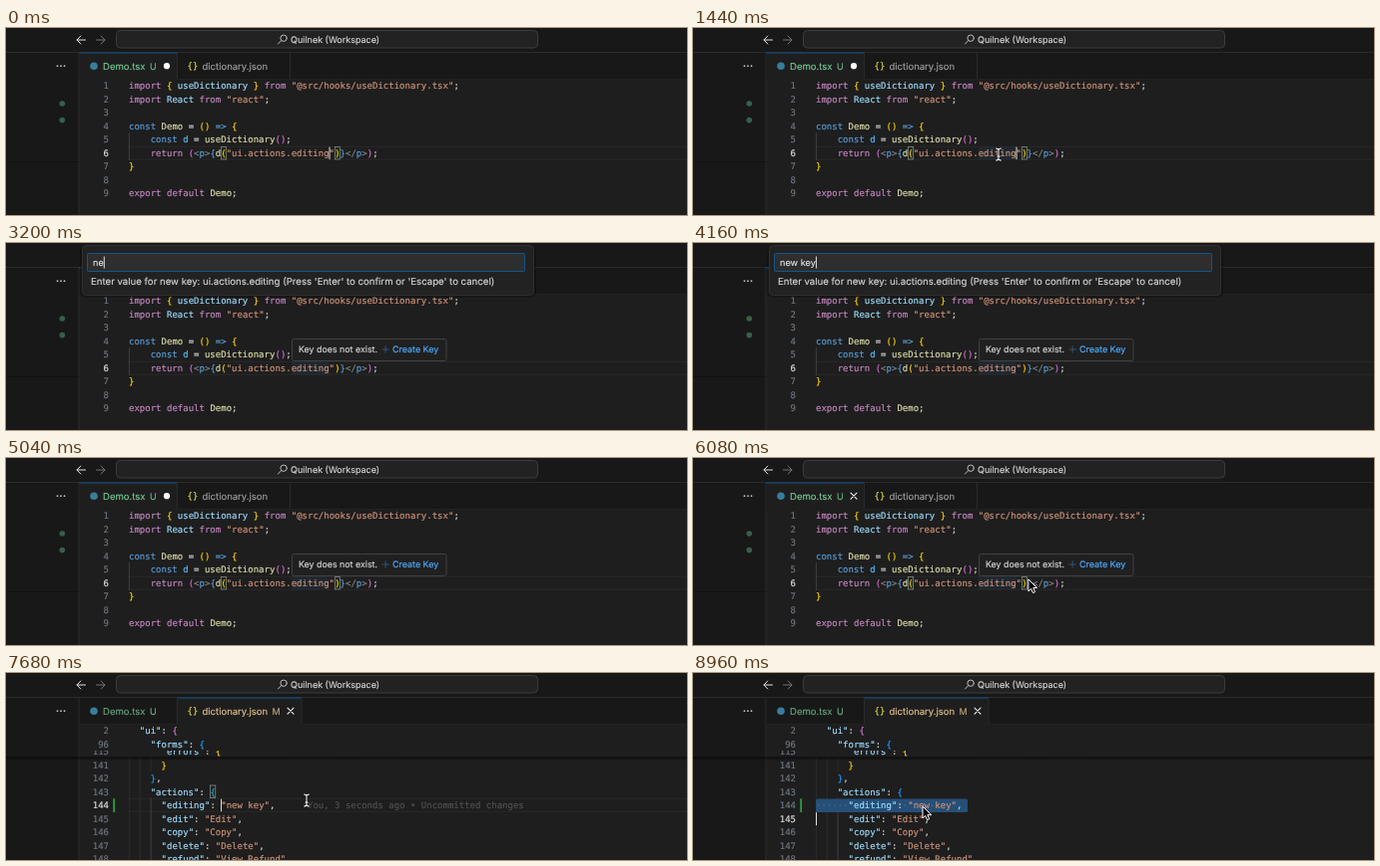
An HTML page for the animation above (9040 ms loop, 682 by 188 pixels).

```html
<!DOCTYPE html>
<html lang="en">
<head>
<meta charset="utf-8">
<title>Create a missing dictionary key</title>
<style>
  html, body { margin: 0; width: 100%; height: 100%; overflow: hidden; background: #181818; }
  svg { display: block; width: 682px; height: 188px; }
  text {
    white-space: pre; text-rendering: geometricPrecision;
    fill: currentColor; stroke: currentColor; stroke-width: .16px;
  }
  .code { font: 9px "DejaVu Sans Mono", monospace; }
  .ui { font-family: Inter, sans-serif; }
  .line { fill: none; stroke-linecap: round; stroke-linejoin: round; }
</style>
</head>
<body>
<svg id="stage" viewBox="0 0 682 188"></svg>
<script>
const LOOP = 9040, STEP = 80;
const LEFT = 123, CHAR = 5.425, ROW = 13.5;

// Moments at which the scene changes, in ms
const at = {
  hover: 1440, tooltip: 1760, popup: 2720, typing: 3040, close: 4240,
  save: 5440, open: 7200, blame: 7360, select: 8800
};

// Pointer path: time, x, y
const path = [
  [1040, 336, 146], [1440, 306, 127], [1920, 306, 127], [2400, 402, 107],
  [5600, 402, 107], [6400, 300, 130], [7040, 300, 130], [7200, 301, 128],
  [7840, 301, 128], [8480, 230, 134], [9040, 230, 134]
];

const ink = {
  k: '#c586c0', v: '#9cdcfe', s: '#ce9178', c: '#569cd6', f: '#dcdcaa',
  n: '#4fc1ff', w: '#d4d4d4', t: '#808080',
  1: '#ffd700', 2: '#da70d6', 3: '#179fff'
};
const bright = '#e0e0e0', muted = '#9d9d9d', dimNumber = '#6e7681';

// Each segment starts with its ink key; segments are split by "~"
const tsx = [
  'kimport ~1{ ~vuseDictionary ~1} ~kfrom ~s"@src/hooks/useDictionary.tsx"~w;',
  'kimport ~vReact ~kfrom ~s"react"~w;',
  '',
  'cconst ~fDemo ~w= ~1() ~c=> ~1{',
  'w    ~cconst ~nd ~w= ~fuseDictionary~2()~w;',
  'w    ~kreturn ~2(~t<~cp~t>~c{~fd~1(~s"ui.actions.editing"~1)~c}~t</~cp~t>~2)~w;',
  '1}',
  '',
  'kexport ~kdefault ~fDemo~w;'
];
const entry = (key, value) => `w      ~v"${key}"~w: ~s"${value}"~w,`;
const json = [
  'w      ~1}',
  'w    ~3}~w,',
  'w    ~v"actions"~w: ~3{',
  entry('editing', 'new key'), entry('edit', 'Edit'), entry('copy', 'Copy'),
  entry('delete', 'Delete'), entry('refund', 'View Refund')
];

const col = n => LEFT + n * CHAR;
const rect = (x, y, w, h, fill, more = '') =>
  `<rect x="${x}" y="${y}" width="${w}" height="${h}" fill="${fill}" ${more}/>`;
const stroke = (d, color, width = 1, more = '') =>
  `<path class="line" d="${d}" stroke="${color}" stroke-width="${width}" ${more}/>`;
const dot = (x, y, r, fill, more = '') => `<circle cx="${x}" cy="${y}" r="${r}" fill="${fill}" ${more}/>`;
const label = (x, y, size, color, str, more = '') =>
  `<text class="ui" x="${x}" y="${y}" font-size="${size}" color="${color}" ${more}>${str}</text>`;
const mono = (x, y, color, str, more = '') =>
  `<text class="code" x="${x}" y="${y}" color="${color}" ${more}>${str}</text>`;
const group = (id, body) => `<g id="${id}">${body}</g>`;

function code(source, y) {
  let n = 0;
  return source.split('~').filter(Boolean).map(part => {
    const str = part.slice(1), x = col(n);
    n += str.length;
    return mono(x, y, ink[part[0]], str.replace(/</g, '&lt;'));
  }).join('');
}
const lineNo = (n, y, more = '', color = dimNumber) =>
  mono(103, y, color, n, `text-anchor="end" ${more}`);
const caret = (id, x, y, h = 12.5) => rect(x, y, 1, h, bright, `id="${id}"`);
const bracket = (n, y) => rect(col(n) + .2, y, 5.2, 12.4, '#00640022', 'stroke="#888" stroke-width=".8"');
const activeLine = y => stroke(`M123 ${y}H682M123 ${y + 13}H682`, '#292929');
const guide = (n, y1, y2, color = '#303030') => stroke(`M${col(n) + .4} ${y1}V${y2}`, color, .8);
const cross = x => stroke(`M${x - 3} 35.2l6 6m0 -6l-6 6`, '#f0f0f0', 1.1);

const frameArt =
  rect(0, 0, 682, 188, '#181818') +
  rect(73, 51, 609, 137, '#1e1e1e') +
  stroke('M0 24.5H682M73 24.5V188', '#2b2b2b') +
  stroke('M73.5 51.5H682', '#222222') +
  [51.5, 55, 58.5].map(x => dot(x, 38.2, .9, '#c4c4c4')).join('');

const titleBar = group('titleBar',
  stroke('M79.5 12H71M74.8 8L71 12l3.8 4', bright) +
  stroke('M90.5 12H99M95.2 8L99 12l-3.8 4', '#757575') +
  rect(110.5, 2.5, 422, 17.5, '#222222', 'rx="4" stroke="#3c3c3c"') +
  stroke('M275.6 12.7L272.5 16M281.3 10.2a3.2 3.2 0 1 1 -6.4 0a3.2 3.2 0 1 1 6.4 0', '#cccccc', .9) +
  label(285, 15, 9, '#d4d4d4', 'Quilnek (Workspace)'));

const tabs =
  group('tabsTsx',
    rect(73.5, 25, 98, 27, '#1e1e1e') + rect(73, 24.5, 98.5, 1, '#0f5288') +
    stroke('M171.5 25V51M284.5 25V51', '#2b2b2b')) +
  group('tabsJson',
    rect(171.5, 25, 124.5, 27, '#1e1e1e') + rect(171, 24.5, 125, 1, '#0f5288') +
    stroke('M171.5 25V51M296 25V51', '#2b2b2b') +
    label(266.5, 41.6, 9, '#c0a478', 'M') + cross(285)) +
  dot(88, 38.2, 3.8, '#397d9c') +
  label(97, 41.6, 9.55, '#73c991', 'Demo.tsx', 'id="nameTsx"') +
  label(144, 41.6, 9, '#68b583', 'U') +
  mono(181.5, 41, '#d6d645', '{}') +
  label(196.5, 41.6, 9.5, muted, 'dictionary.json', 'id="nameJson"') +
  dot(161, 38.2, 3.1, '#ffffff', 'id="unsaved"') +
  group('saved', cross(161));

const tsxView = group('tsxView',
  stroke('M0 134.5H72', '#111111') +
  dot(56.3, 76, 2.8, '#37604a') + dot(56.3, 92.6, 2.8, '#37604a') +
  activeLine(119.3) + guide(0, 105.5, 132.5, '#4a4a4a') +
  rect(col(30), 119.6, 7 * CHAR, 12.4, '#264f78', 'id="wordHover" opacity=".22"') +
  group('brackets', bracket(17, 119.6) + bracket(38, 119.6)) +
  tsx.map((s, i) => {
    const y = 61 + i * ROW;
    return lineNo(i + 1, y, '', i === 5 ? bright : dimNumber) + code(s, y);
  }).join('') +
  caret('caretTsx', col(37) - .2, 119.6));

const rowY = i => 95.6 + i * ROW;
const jsonView = group('jsonView',
  group('jsonActive', activeLine(126.4) + bracket(15, 113)) +
  guide(0, 85, 188) + guide(2, 85, 188) + guide(4, 85, 99) + guide(4, 126, 188, '#484848') +
  group('selection',
    rect(LEFT, 126.4, 152, 13.5, '#264f78', 'rx="1.5"') +
    [0, 1, 2, 3, 4, 5, 16, 21].map(n => dot(col(n + .5), 133, .55, '#7389a0')).join('')) +
  json.map((s, i) => lineNo(141 + i, rowY(i), `id="no${141 + i}"`) + code(s, rowY(i))).join('') +
  rect(107.3, 126.3, 1.8, 13.6, '#2ea043') +
  mono(col(33), rowY(3), '#505050', 'You, 3 seconds ago • Uncommitted changes', 'id="blame"') +
  rect(73.5, 52, 609, 32.5, '#1e1e1e') +
  `<g clip-path="url(#pushed)">${lineNo(115, 82.2)}${code('w      ~v"errors"~w: ~1{', 82.2)}</g>` +
  lineNo(2, 61.1) + code('w  ~v"ui"~w: ~2{', 61.1) +
  lineNo(96, 74.6) + code('w    ~v"forms"~w: ~3{', 74.6) +
  rect(0, 84.3, 682, 4, 'url(#shade)') +
  caret('caretJson', col(17) - .2, 126.7) +
  caret('caretSelect', LEFT, 140.2, 13));

const tooltip = group('tooltip',
  rect(286.5, 96.5, 154.5, 22, '#202020', 'rx="2" stroke="#414141"') +
  label(293, 110.3, 8.85, '#d4d4d4', 'Key does not exist.') +
  stroke('M376.8 107H383.4M380.1 103.7V110.3', '#2b628f', .8) +
  label(387, 110.3, 8.95, '#4daafc', 'Create Key'));

const popup = group('popup',
  rect(74, 4, 457, 51, '#000', 'rx="5" opacity=".25"') +
  rect(76.5, 2.5, 452, 50, '#222222', 'rx="4" stroke="#303030"') +
  rect(81.5, 10.5, 438, 18, '#2e2e2e', 'rx="1" stroke="#10568f"') +
  label(87, 23, 9.2, bright, '', 'id="typed"') +
  caret('caretInput', 87, 13.5, 12) +
  label(85, 42.2, 9.63, '#d4d4d4',
    "Enter value for new key: ui.actions.editing (Press 'Enter' to confirm or 'Escape' to cancel)"));

const pointer = group('pointer',
  '<path id="arrow" d="M0 0V12l2.7 -2.5L4.6 13.7l2 -.9L4.8 8.7H8.7Z" fill="#000" stroke="#fff" stroke-width="1"/>' +
  group('beam', ['#000', '#fff'].map((c, i) =>
    stroke('M-2.5 -6Q0 -6 0 -4V4Q0 6 -2.5 6M2.5 -6Q0 -6 0 -4M2.5 6Q0 6 0 4M-1.2 2H1.2', c, i ? 1.1 : 2.2)).join('')));

document.getElementById('stage').innerHTML =
  '<defs><clipPath id="pushed"><path d="M73 78H682V84.5H73Z"/></clipPath>' +
  '<linearGradient id="shade" x2="0" y2="1"><stop stop-opacity=".6"/><stop offset="1" stop-opacity="0"/></linearGradient></defs>' +
  frameArt + titleBar + tabs + tsxView + jsonView + tooltip + popup + pointer;

const el = {};
document.querySelectorAll('[id]').forEach(node => el[node.id] = node);
const show = (id, on) => el[id].setAttribute('visibility', on ? 'inherit' : 'hidden');
const tint = (id, color) => el[id].setAttribute('color', color);
const between = (t, a, b) => t >= a && t < b;
const blink = (t, since) => (t - since) % 1000 < 500;

function pointerAt(t) {
  const i = Math.max(1, path.findIndex(p => p[0] > t));
  const [t0, x0, y0] = path[i - 1], [t1, x1, y1] = path[i];
  const p = Math.min(1, Math.max(0, (t - t0) / (t1 - t0)));
  const e = p * p * (3 - 2 * p);
  return [x0 + (x1 - x0) * e, y0 + (y1 - y0) * e];
}

function render(t) {
  const inJson = t >= at.open, selected = t >= at.select;
  const asking = between(t, at.popup, at.close);

  show('titleBar', !asking);
  show('popup', asking);
  show('tsxView', !inJson);
  show('tabsTsx', !inJson);
  show('jsonView', inJson);
  show('tabsJson', inJson);
  show('unsaved', t < at.save);
  show('saved', !inJson && t >= at.save);
  tint('nameTsx', inJson ? '#62a57c' : '#73c991');
  tint('nameJson', inJson ? '#e2c08d' : muted);

  show('wordHover', !inJson && t >= at.hover);
  show('brackets', !inJson && !asking);
  show('tooltip', between(t, at.tooltip, at.open));
  show('caretTsx', !inJson && !asking && blink(t, t < at.close ? 0 : at.close));

  const count = Math.min(7, Math.max(0, Math.floor((t - at.typing) / 120) + 1));
  const lastKey = count ? at.typing + (count - 1) * 120 : at.popup;
  el.typed.textContent = 'new key'.slice(0, count);
  el.caretInput.setAttribute('x', 87 + el.typed.getComputedTextLength());
  show('caretInput', asking && blink(t, lastKey));

  show('jsonActive', inJson && !selected);
  show('selection', selected);
  show('blame', between(t, at.blame, at.select));
  show('caretJson', inJson && !selected && blink(t, at.open));
  show('caretSelect', selected);
  tint('no144', selected ? dimNumber : bright);
  tint('no145', selected ? bright : dimNumber);

  const beam = t < 2000 || (inJson && !selected);
  const [x, y] = pointerAt(t);
  el.pointer.setAttribute('transform', `translate(${x} ${y})`);
  show('pointer', between(t, path[0][0], at.typing) || t >= 5600);
  show('arrow', !beam);
  show('beam', beam);
}

const start = performance.now();
function tick() {
  const t = (performance.now() - start) % LOOP;
  render(Math.floor(t / STEP) * STEP);
  requestAnimationFrame(tick);
}
render(0);
requestAnimationFrame(tick);
</script>
</body>
</html>
```
